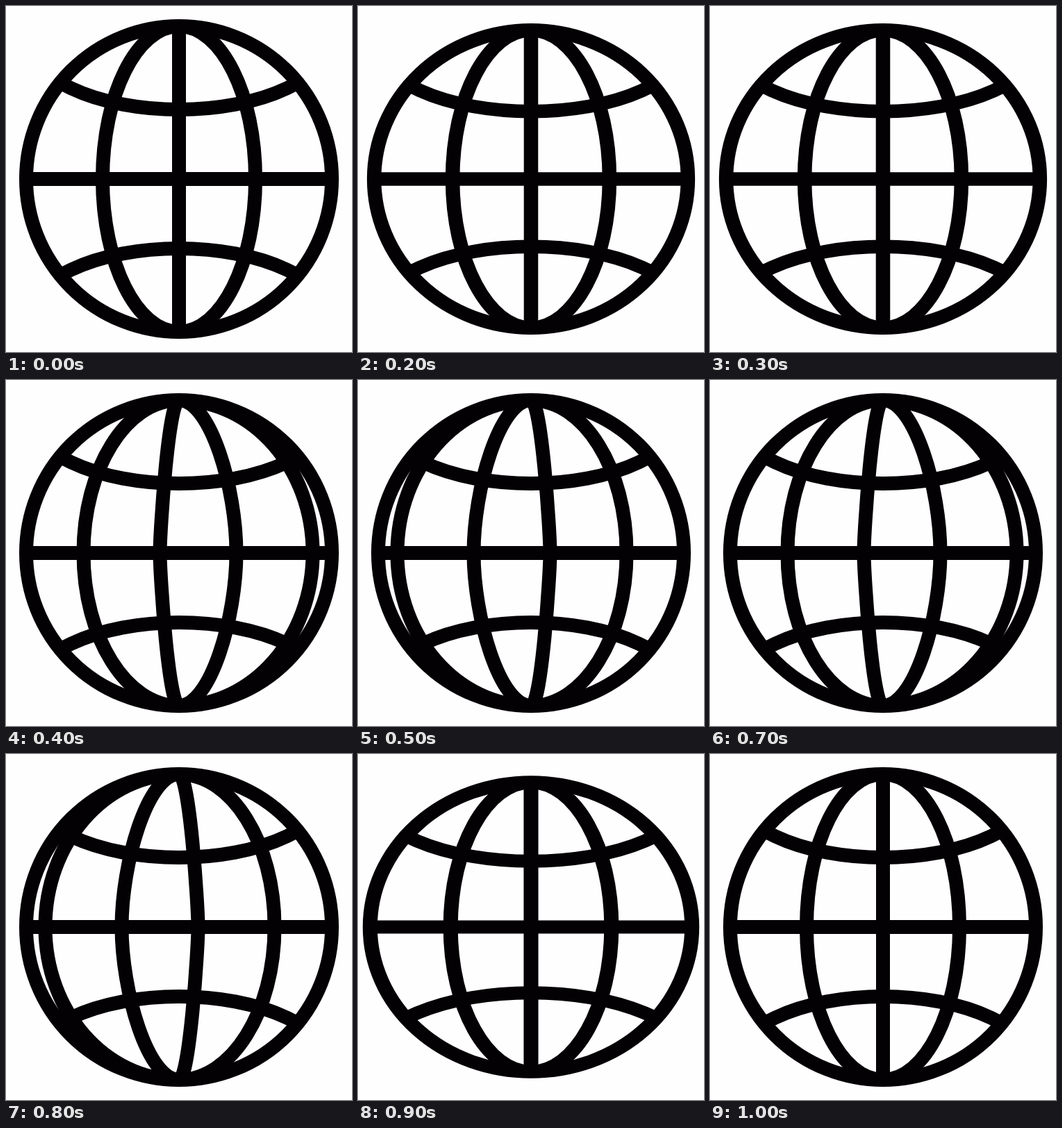
Animation of 498 by 498 pixels, one loop 1150 ms. Source, as an HTML page with a canvas:

```html
<!DOCTYPE html>
<html lang="en">
<head>
<meta charset="utf-8">
<title>Spinning globe</title>
<style>
  html, body { margin: 0; width: 100%; height: 100%; overflow: hidden; background: #fefefe; }
  canvas { display: block; filter: blur(0.6px); } /* soft edges */
</style>
</head>
<body>
<canvas id="stage" width="498" height="498"></canvas>
<script>
const ctx = document.getElementById('stage').getContext('2d');
const LOOP = 1150, STEP = 50, HOLD = 200;
const R = 220, GAP = R / 2, LINE = 20;
const KAPPA = 0.5523; // Bezier handle length of a quarter ellipse

function pose(time) {
  const step = Math.floor((time - HOLD) / STEP);
  // Squash before and after the spin, peaking at steps 1 and 14.
  const dist = Math.min(Math.abs(step - 1), Math.abs(step - 14));
  const squash = Math.max(0, 1 - dist / 2);
  const spin = step >= 4 && step <= 12 ? ((step - 4) % 3 + 1) / 4 : 0;
  return { squash, spin };
}

function arc(y, rx, ry, from, to) {
  ctx.beginPath();
  ctx.ellipse(0, y, rx, ry, 0, from, to);
  ctx.stroke();
}

function line(x, y) {
  ctx.beginPath();
  ctx.moveTo(-x, -y);
  ctx.lineTo(x, y);
  ctx.stroke();
}

// Half an ellipse that morphs into a straight line near the centre.
function meridian(x) {
  if (x === 0) return line(0, R);
  const bend = KAPPA * R * Math.min(1, Math.abs(x) / GAP);
  ctx.beginPath();
  ctx.moveTo(0, -R);
  ctx.bezierCurveTo(KAPPA * x, -R, x, -bend, x, 0);
  ctx.bezierCurveTo(x, bend, KAPPA * x, R, 0, R);
  ctx.stroke();
}

function draw({ squash, spin }) {
  ctx.fillStyle = '#fefefe';
  ctx.fillRect(0, 0, 498, 498);
  ctx.save();
  ctx.translate(249, 249);
  ctx.scale(1 + 0.053 * squash, 1 - 0.053 * squash);
  ctx.strokeStyle = '#030104';
  ctx.lineWidth = LINE;
  arc(0, R, R, 0, 2 * Math.PI);

  ctx.beginPath();
  ctx.arc(0, 0, R + LINE / 2 - 1, 0, 2 * Math.PI);
  ctx.clip();
  line(R, 0);
  arc(-205, R, 105, 0, Math.PI);
  arc(205, R, 105, Math.PI, 2 * Math.PI);
  for (let k = -1; k <= 2; k++) {
    const x = (k - spin) * GAP;
    if (Math.abs(x) < R) meridian(x);
  }
  ctx.restore();
}

const start = performance.now();
function tick() {
  draw(pose((performance.now() - start) % LOOP));
  requestAnimationFrame(tick);
}
tick();
</script>
</body>
</html>
```
